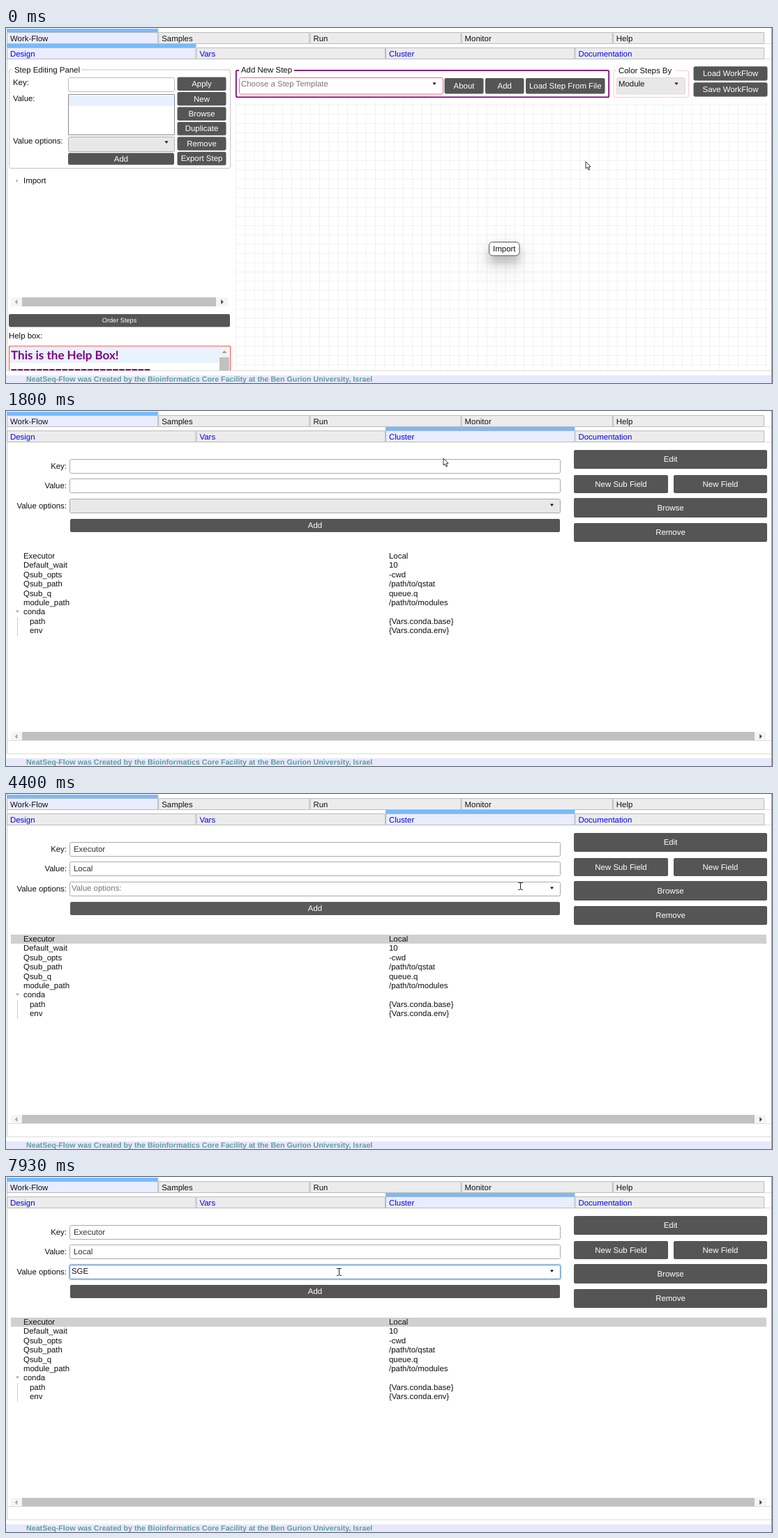
These frames come from a looping animation (1098x510 px, 8 s). An HTML page with a canvas:

```html
<!DOCTYPE html>
<html lang="en">
<head>
<meta charset="utf-8">
<title>Workflow designer</title>
<style>
html, body { margin: 0; width: 100%; height: 100%; overflow: hidden; background: #fff; }
canvas { display: block; width: 1098px; height: 510px; }
</style>
</head>
<body>
<canvas id="stage" width="1098" height="510"></canvas>
<script>
const ctx = document.getElementById('stage').getContext('2d');
const LOOP = 8000, FPS = 15;
const SANS = '"Liberation Sans", Arial, sans-serif';
const DARK = '#555', TINT = '#eaecff', BLUE = '#77bbff';

// Moments at which the interface changes, in ms
const SWITCH = 1200, LAID_OUT = 1460, SELECT = 3066, OPEN = 5466, CHOOSE = 6733;

// Pointer path: [time, x, y]
const PATH = [
  [0, 831, 192], [100, 831, 192], [867, 644, 33], [1470, 644, 33], [2600, 561, 204],
  [3430, 561, 204], [4133, 705, 158], [4400, 737, 132], [4460, 737, 132], [5133, 784, 134],
  [6090, 784, 134], [6400, 773, 148], [7160, 773, 148], [7330, 690, 151],
  [7660, 421, 138], [7930, 477, 136], [8000, 477, 136]
];

const clamp = v => Math.max(0, Math.min(1, v));
const ramp = (t, from, to) => clamp((t - from) / (to - from));
const ease = u => u * u * (3 - 2 * u);

function pointerAt(t) {
  const i = Math.max(1, PATH.findIndex(p => p[0] >= t));
  const [t0, x0, y0] = PATH[i - 1], [t1, x1, y1] = PATH[i];
  const u = ease(ramp(t, t0, t1));
  return { x: x0 + (x1 - x0) * u, y: y0 + (y1 - y0) * u };
}

function text(s, x, y, { color = '#111', size = 11.43, align = 'left', weight = '', family = SANS } = {}) {
  ctx.font = `${weight} ${size}px ${family}`;
  ctx.textAlign = align;
  ctx.fillStyle = color;
  ctx.fillText(s, x, y);
}

function rect(x1, y1, x2, y2, fill) {
  ctx.fillStyle = fill;
  ctx.fillRect(x1, y1, x2 - x1, y2 - y1);
}

// Rounded box whose border lies inside the given edges
function box(x1, y1, x2, y2, fill, stroke, radius = 2, line = 1) {
  const h = line / 2;
  ctx.beginPath();
  ctx.roundRect(x1 + h, y1 + h, x2 - x1 - line, y2 - y1 - line, radius);
  if (fill) { ctx.fillStyle = fill; ctx.fill(); }
  if (stroke) { ctx.strokeStyle = stroke; ctx.lineWidth = line; ctx.stroke(); }
}

function polygon(points, fill, stroke) {
  ctx.beginPath();
  points.forEach(([x, y]) => ctx.lineTo(x, y));
  ctx.closePath();
  ctx.fillStyle = fill;
  ctx.fill();
  if (stroke) { ctx.strokeStyle = stroke; ctx.lineWidth = 1; ctx.stroke(); }
}

function button(label, x1, y1, x2, y2, { size, fill = DARK } = {}) {
  box(x1, y1, x2, y2, fill, fill, 1.5);
  text(label, (x1 + x2) / 2, (y1 + y2) / 2 + (size ? 3 : 3.8), { color: '#fff', size, align: 'center' });
}

function fieldset(legend, x1, y1, x2, y2, stroke, line, textX, gapEnd) {
  box(x1, y1, x2, y2, null, stroke, 2, line);
  rect(textX - 3, y1 - 2, gapEnd, y1 + 4, '#fff');
  text(legend, textX, y1 + 4.3);
}

const downArrow = (x, y, color = '#111', r = 2.5) =>
  polygon([[x - r, y - 1.5], [x + r, y - 1.5], [x, y + 2]], color);
const sideArrow = (x, y, dir, color, r = 4) =>
  polygon([[x - dir * r / 2, y - r], [x + dir * r / 2, y], [x - dir * r / 2, y + r]], color);

function scrollbar(x1, y, x2, thumb1, thumb2) {
  rect(x1, y, x2, y + 13, '#f5f5f5');
  rect(thumb1, y, thumb2, y + 13, '#c1c1c1');
  sideArrow(x1 + 7.5, y + 6.5, -1, '#a3a3a3', 3.5);
  sideArrow(x2 - 8, y + 6.5, 1, '#444', 3.5);
}

function tabs(labels, width, top, selected, hovered, color) {
  labels.forEach((label, i) => {
    const x = 1 + i * width, end = x + width, bottom = top + 17;
    const active = i === selected;
    box(x, top, end, bottom, active || i === hovered ? TINT : '#ececec', '#bbb', 0);
    if (active) rect(x, top - 5, end, top, BLUE);
    text(label, x + 5, top + 13, { color });
  });
}

function frame(clusterOpen, hoverCluster) {
  rect(0, 0, 1098, 510, '#fff');
  rect(1, 22, 1097, 23, '#ddd');
  rect(1, 44, 1097, 45, '#ddd');
  rect(1, 0, 2, 492, '#ccc');
  rect(1, 492, 1097, 493, '#ddd');
  tabs(['Work-Flow', 'Samples', 'Run', 'Monitor', 'Help'], 217.2, 6, 0, -1, '#111');
  tabs(['Design', 'Vars', 'Cluster', 'Documentation'], 271.5, 28, clusterOpen ? 2 : 0, hoverCluster ? 2 : -1, '#00f');
  rect(0, 499, 1098, 510, '#e8e8fc');
  text('NeatSeq-Flow was Created by the Bioinformatics Core Facility at the Ben Gurion University, Israel',
    29, 508, { color: '#5f9ea0', size: 10.7, weight: 'bold' });
  rect(1097, 0, 1098, 510, '#999');
}

function stepPanel() {
  fieldset('Step Editing Panel', 4, 59.5, 322, 202, '#c4c4c4', 1, 12, 108);
  text('Key:', 10, 82);
  text('Value:', 10, 105);
  text('Value options:', 10, 166);
  box(89, 71, 242, 92, '#fff', '#bbb');
  box(89, 95, 242, 154, '#fff', '#888', 0);
  rect(90, 97, 241, 112, '#e8f2ff');
  box(89, 156, 242, 178, '#e8e8e8', '#aaa');
  downArrow(230, 164);
  button('Add', 89, 179.5, 241, 196.5);
  ['Apply', 'New', 'Browse', 'Duplicate', 'Remove', 'Export Step'].forEach((label, i) =>
    button(label, 245.5, 70.6 + i * 21.45, 315.5, 90 + i * 21.45));

  sideArrow(16, 219.5, 1, '#aaa', 2.5);
  text('Import', 25, 223);
  scrollbar(7, 387, 318, 23, 301);
  button('Order Steps', 4, 411, 321, 429.5, { size: 9.2 });
  text('Help box:', 4, 446);

  ctx.save();
  ctx.beginPath();
  ctx.rect(0, 450, 330, 42);
  ctx.clip();
  box(4, 456.5, 322, 520, '#fff', '#f44', 0);
  rect(5, 458, 306, 481, '#e8f2ff');
  text('This is the Help Box!', 7, 476, { color: '#800080', size: 17, weight: 'bold', family: 'Lato, Carlito, sans-serif' });
  for (let i = 0; i < 22; i++) rect(7.5 + i * 9.1, 490, 15.3 + i * 9.1, 492, '#800080');
  rect(306, 458, 320, 492, '#f3f3f3');
  rect(306, 473, 320, 492, '#c1c1c1');
  polygon([[309.5, 467], [316.5, 467], [313, 463.5]], '#999');
  ctx.restore();
}

function importNode() {
  const edges = [692, 307, 736.5, 327.5];
  for (const [dy, blur, alpha] of [[15, 43, 0.19], [10, 14, 0.24]]) {
    ctx.save();
    ctx.shadowColor = `rgba(0,0,0,${alpha})`;
    ctx.shadowBlur = blur;
    ctx.shadowOffsetY = dy;
    box(...edges, '#fff', null, 5);
    ctx.restore();
  }
  box(...edges, '#fff', '#555', 5);
  text('Import', 714.3, 321, { align: 'center' });
}

function designView() {
  for (let x = 329; x < 1093; x += 13.33) rect(x, 106, x + 1, 492, '#f1f1f1');
  for (let y = 110; y < 492; y += 13.33) rect(329, y, 1093, y + 1, '#f1f1f1');
  stepPanel();
  fieldset('Add New Step', 329, 60, 865, 100.3, '#800080', 1.7, 337, 413);
  box(334, 71, 627, 95.5, '#fff', '#f66');
  text('Choose a Step Template', 337, 84, { color: '#777' });
  downArrow(614, 80);
  button('About', 628.5, 72, 684.5, 94.5);
  button('Add', 687, 72, 742.5, 94.5);
  button('Load Step From File', 745, 72, 858.5, 94.5);
  fieldset('Color Steps By', 870.5, 60.5, 979, 100, '#ffc5cd', 1, 878, 959);
  box(875, 71, 974, 95.5, '#e8e8e8', '#f0d0d4');
  text('Module', 878, 84);
  downArrow(961, 80);
  button('Load WorkFlow', 985.5, 55.3, 1091.5, 75.6);
  button('Save WorkFlow', 985.5, 78.3, 1091.5, 98.6);
  importNode();
}

function clusterButtons(wide) {
  const [editEnd, row, subEnd, field, fieldEnd, browse, remove] =
    wide ? [83, 92, 949, 957, 1091, 125, 161] : [81, 91, 929, 936, 1071, 123, 156];
  button('Edit', 814, 56, 1091, editEnd);
  button('New Sub Field', 814, row, subEnd, row + 26);
  button('New Field', field, row, fieldEnd, row + 26);
  button('Browse', 814, browse, 1091, browse + (wide ? 28 : 26));
  button('Remove', 814, remove, 1091, remove + (wide ? 27 : 28));
}

const SETTINGS = [
  ['Executor', 'Local'], ['Default_wait', '10'], ['Qsub_opts', '-cwd'], ['Qsub_path', '/path/to/qstat'],
  ['Qsub_q', 'queue.q'], ['module_path', '/path/to/modules'], ['conda', ''],
  ['path', '{Vars.conda.base}'], ['env', '{Vars.conda.env}']
];

function clusterView(t, pointer) {
  const wide = t >= LAID_OUT, selected = t >= SELECT, right = wide ? 795 : 476;
  const focus = ramp(t, OPEN - 60, OPEN + 330);

  ['Key:', 'Value:', 'Value options:'].forEach((label, i) =>
    text(label, 87, 82.5 + i * 28.5, { align: 'right' }));
  box(91, 69, right, 90, '#fff', '#aaa');
  box(91, 97, right, 118, '#fff', '#aaa');
  if (focus) {
    ctx.globalAlpha = focus;
    box(89.5, 124.5, right + 1.5, 148.5, null, '#bbdcff', 3, 2);
    ctx.globalAlpha = 1;
  }
  box(91, 126, right, 147, selected ? '#fff' : '#e8e8e8', focus ? '#5a8fc0' : '#aaa');
  downArrow(right - 12.5, 135);

  const hover = Math.max(
    ramp(t, 2170, 2300) * (1 - ramp(t, 2300, 2560)),
    ramp(t, 3870, 4130) * (1 - ramp(t, 4190, 4460)));
  const shade = Math.round(85 + 17 * hover);
  button('Add', 92, 155, right - 1, 174, { fill: `rgb(${shade},${shade},${shade})` });
  clusterButtons(wide);

  if (selected) {
    text('Executor', 97, 82.5, { color: '#333' });
    text('Local', 97, 111, { color: '#333' });
    if (t < CHOOSE) text('Value options:', 94, 139, { color: '#777' });
    else text('SGE', 94, 139);
    rect(7, 202, 1090, 215, '#d0d0d0');
  }
  SETTINGS.forEach(([key, value], i) => {
    const y = 212 + i * 13.4;
    text(key, i > 6 ? 34 : 25, y);
    text(value, 549, y);
  });
  downArrow(16.5, 288, '#aaa');
  rect(16, 296, 17, 323, '#ccc');
  if (wide) scrollbar(7, 461, 1090, 23, 1073);
  rect(1, 473, 1097, 474, '#ddd');

  if (t >= OPEN && t < CHOOSE) {
    box(91, 146, 795, 217, '#fff', '#444', 0);
    if (pointer.y > 146) rect(92, 147, 794, 161, '#cde8ff');
    ['SGE', 'SLURM', 'Local'].forEach((s, i) => text(s, 94, 158 + i * 13.4));
  }
}

function drawPointer({ x, y }, t) {
  const inField = (y1, y2) => x > 92 && x < 770 && y > y1 && y < y2;
  const beam = t >= LAID_OUT && (inField(69, 89) || inField(97, 118) || (t >= SELECT && inField(126, 146)));
  x = Math.round(x);
  y = Math.round(y);
  if (beam) {
    rect(x, y - 5, x + 1, y + 5, '#222');
    for (const end of [-5, 5]) {
      rect(x - 3, y + end, x, y + end + 1, '#333');
      rect(x + 1, y + end, x + 4, y + end + 1, '#333');
    }
    return;
  }
  const shape = [[0, 0], [0, 10], [2.3, 8], [4, 12], [5.7, 11.2], [4.1, 7.5], [7, 7.2]];
  polygon(shape.map(([dx, dy]) => [x + dx, y + dy]), '#fff', '#333');
}

function draw(now) {
  const t = Math.floor(((now % LOOP) + 4) * FPS / 1000) * 1000 / FPS;
  const pointer = pointerAt(Math.min(t, LOOP));
  const clusterOpen = t >= SWITCH;
  ctx.textRendering = 'geometricPrecision';
  frame(clusterOpen, pointer.y > 28 && pointer.y < 44 && pointer.x < 815);
  if (clusterOpen) clusterView(t, pointer);
  else designView();
  drawPointer(pointer, t);
}

const start = performance.now();
function tick() {
  draw(performance.now() - start);
  requestAnimationFrame(tick);
}
tick();
</script>
</body>
</html>
```
